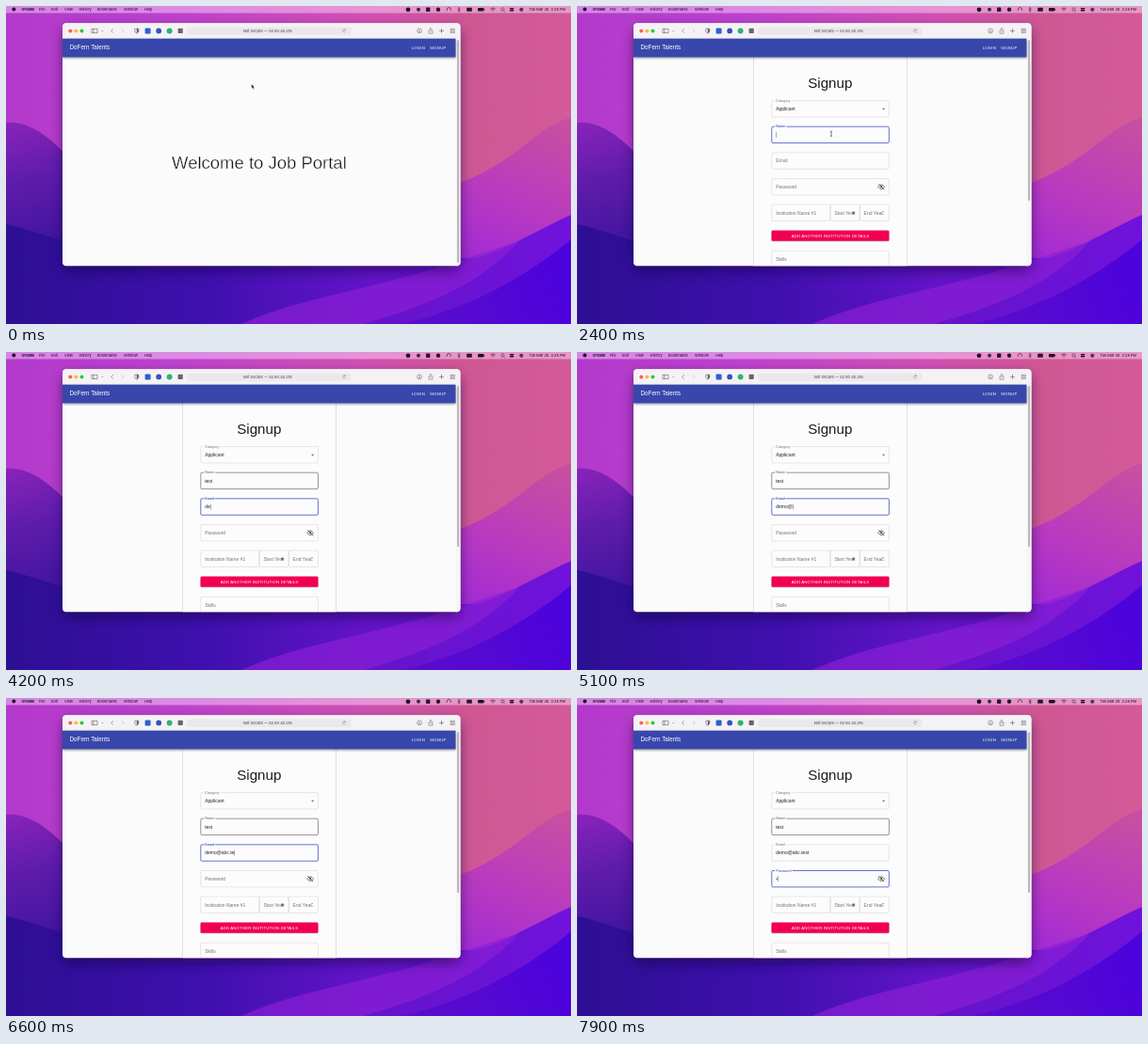
An HTML page for the animation above (8 s loop, 600x338 px).

```html
<!DOCTYPE html>
<html lang="en">
<head>
<meta charset="utf-8">
<title>Signup walkthrough</title>
<style>
  html, body { margin: 0; width: 100%; height: 100%; overflow: hidden; background: #6a1fc0; }
  svg { display: block; width: 100%; height: 100%; }
  text { font-family: "Liberation Sans", Arial, sans-serif; white-space: pre; }
  .ui { font-family: Inter, "Open Sans", sans-serif; }
</style>
</head>
<body>
<svg id="stage" viewBox="0 0 600 338">
  <defs>
    <linearGradient id="sky" x1="0" y1="0" x2="600" y2="0" gradientUnits="userSpaceOnUse">
      <stop offset="0" stop-color="#b239cb"/><stop offset=".3" stop-color="#bd42cd"/>
      <stop offset=".62" stop-color="#cf50b4"/><stop offset=".82" stop-color="#cf5794"/>
      <stop offset="1" stop-color="#d45a99"/>
    </linearGradient>
    <linearGradient id="leftHill" x1="0" y1="115" x2="40" y2="270" gradientUnits="userSpaceOnUse">
      <stop offset="0" stop-color="#8f24bd"/><stop offset=".45" stop-color="#5f1cab"/>
      <stop offset="1" stop-color="#3b139c"/>
    </linearGradient>
    <linearGradient id="rightHill" x1="570" y1="110" x2="490" y2="300" gradientUnits="userSpaceOnUse">
      <stop offset="0" stop-color="#c7519f"/><stop offset=".45" stop-color="#bb3cbd"/>
      <stop offset="1" stop-color="#9a25dc"/>
    </linearGradient>
    <linearGradient id="floor" x1="0" y1="0" x2="600" y2="0" gradientUnits="userSpaceOnUse">
      <stop offset="0" stop-color="#2c0f92"/><stop offset=".35" stop-color="#3f0fae"/>
      <stop offset=".65" stop-color="#6414ca"/><stop offset="1" stop-color="#7012dc"/>
    </linearGradient>
    <linearGradient id="corner" x1="430" y1="338" x2="600" y2="270" gradientUnits="userSpaceOnUse">
      <stop offset="0" stop-color="#5a0dcc"/><stop offset="1" stop-color="#4b02dc"/>
    </linearGradient>
    <filter id="shade" x="-20%" y="-20%" width="140%" height="150%"><feGaussianBlur stdDeviation="7"/></filter>
    <filter id="soft" x="-5%" y="-50%" width="110%" height="220%"><feGaussianBlur stdDeviation="1"/></filter>
    <clipPath id="frame"><rect x="60" y="18.3" width="422.5" height="258" rx="4"/></clipPath>
  </defs>

  <rect width="600" height="338" fill="url(#sky)"/>
  <path d="M0 124C24 122 44 138 66 160L200 338H0Z" fill="url(#leftHill)"/>
  <path d="M600 118C560 130 540 170 470 192V338H600Z" fill="url(#rightHill)"/>
  <path d="M0 232C40 240 80 262 150 268H500C530 260 570 235 600 222V338H0Z" fill="url(#floor)"/>
  <path d="M250 338C310 310 390 302 483 270L545 250C500 300 440 320 380 338Z" fill="#8a1fd6" opacity=".7"/>
  <path d="M420 338C490 322 550 290 600 248V338Z" fill="url(#corner)"/>
  <rect width="600" height="7.5" fill="#ffe2ff" opacity=".45"/>
  <g id="menu"></g>

  <rect x="61" y="25" width="421" height="256" rx="5" fill="#10002c" opacity=".55" filter="url(#shade)"/>
  <rect x="59.8" y="18.1" width="422.9" height="258.4" rx="4.2" fill="#4a3a5c" opacity=".5"/>
  <g clip-path="url(#frame)">
    <rect x="60" y="18" width="423" height="259" fill="#fcfbfc"/>
    <g id="home"></g>
    <g id="form"></g>
    <rect x="477.5" y="34" width="6" height="243" fill="#f7f6f7"/>
    <rect id="thumb" x="479" y="36" width="2.2" rx="1.1" fill="#b9b8ba"/>
    <rect x="60" y="37" width="417.5" height="18.5" fill="#000" opacity=".4" filter="url(#soft)"/>
    <rect x="60" y="34.3" width="417.5" height="20" fill="#3847ab"/>
    <rect id="hover" x="447" y="38.8" width="24" height="11.3" rx="1.3" fill="#fff" opacity=".12"/>
    <g id="header"></g>
    <rect x="60" y="18" width="423" height="16.3" fill="#f5f2f5"/>
    <path d="M60 34.3H483" stroke="#d6d2d8" stroke-width=".3"/>
    <g id="toolbar"></g>
  </g>
  <path id="arrow" d="M0 0V4.6L1.1 3.7L1.9 5.4L2.7 5L1.9 3.4H3.3Z" fill="#111" stroke="#fff" stroke-width=".35"/>
  <path id="beam" d="M-1.1-2.6Q0-2.6 0-2V2Q0 2.6-1.1 2.6M1.1-2.6Q0-2.6 0-2M0 2Q0 2.6 1.1 2.6" fill="none" stroke="#222" stroke-width=".6"/>
</svg>

<script>
const LOOP = 8000, STEP = 100, FOCUS = "#2f45b8", IDLE = "#c4c3c5", PAPER = "#fdfcfd";
const $ = id => document.getElementById(id);
const clamp = v => Math.max(0, Math.min(1, v));
const mix = (a, b, p) => a + (b - a) * p;
const ease = p => p * p * (3 - 2 * p);

function set(node, attrs) {
  for (const key in attrs) node.setAttribute(key, attrs[key]);
  return node;
}
function add(parent, tag, attrs) {
  const node = document.createElementNS("http://www.w3.org/2000/svg", tag);
  parent.appendChild(set(node, attrs));
  return node;
}
function label(parent, x, y, size, content, attrs = {}) {
  const node = add(parent, "text", { x, y, "font-size": size, fill: "#222", ...attrs });
  node.textContent = content;
  return node;
}
const line = (parent, d, attrs = {}) =>
  add(parent, "path", { d, fill: "none", stroke: "#5c595f", "stroke-width": .6, ...attrs });
const dot = (parent, cx, cy, r, fill) => add(parent, "circle", { cx, cy, r, fill });
const box = (parent, x, y, width, height, rx, fill) => add(parent, "rect", { x, y, width, height, rx, fill });
const show = (node, on) => node.setAttribute("visibility", on ? "visible" : "hidden");

function buildMenu() {
  const g = $("menu"), ui = { class: "ui", fill: "#1c1022" };
  dot(g, 8.3, 3.6, 2, "#1c1022");
  label(g, 16.5, 5, 3.9, "Orvane", { ...ui, "font-weight": 700 });
  [["File", 35], ["Edit", 48], ["View", 62], ["History", 77.5], ["Bookmarks", 97], ["Window", 125], ["Help", 147]]
    .forEach(([name, x]) => label(g, x, 5, 3.9, name, ui));
  dot(g, 427, 3.8, 2.4, "#1c1022");
  dot(g, 438, 3.8, 2, "#3c2440");
  box(g, 446, 1.6, 4.4, 4.4, .8, "#2a1630");
  dot(g, 459, 3.8, 2.2, "#2a1630");
  line(g, "M468.3 5V3.6A2 2 0 0 1 472.3 3.6V5", { stroke: "#1c1022" });
  line(g, "M479.7 2.6L482.3 5L481 6.2V1.3L482.3 2.6L479.7 5", { stroke: "#1c1022", "stroke-width": .45 });
  box(g, 489.2, 1.8, 5.6, 4, .6, "#2a1630");
  box(g, 501, 2, 6.4, 3.6, .8, "#1c1022");
  box(g, 507.7, 3, .5, 1.6, .2, "#1c1022");
  line(g, "M514.4 3Q517 .9 519.6 3M515.5 4.2Q517 3 518.5 4.2M516.6 5.4H517.4", { stroke: "#1c1022" });
  line(g, "M528.5 5L529.8 6.2M529 3.5A1.6 1.6 0 1 1 525.8 3.5A1.6 1.6 0 1 1 529 3.5", { stroke: "#1c1022", "stroke-width": .5 });
  box(g, 534.8, 2, 4.6, 1.5, .75, "#1c1022");
  box(g, 534.8, 4.1, 4.6, 1.5, .75, "#1c1022");
  dot(g, 547.3, 3.8, 2.1, "#4a3a6a");
  label(g, 594, 5, 3.9, "Tue Mar 28  3:28 PM", { ...ui, "text-anchor": "end" });
}

function buildToolbar() {
  const g = $("toolbar");
  ["#fe5f57", "#febc2e", "#28c840"].forEach((fill, i) => dot(g, 68.3 + i * 6.1, 26.4, 2, fill));
  line(g, "M91 24.3H97V28.6H91ZM93 24.3V28.6");
  line(g, "M101.4 26L102.4 27L103.4 26", { "stroke-width": .4 });
  line(g, "M113.7 24.3L111.7 26.4L113.7 28.5");
  line(g, "M123 24.3L125 26.4L123 28.5", { stroke: "#b4b0b6" });
  line(g, "M136.7 24.4L138.8 23.8L140.9 24.4V26.5Q140.6 28.4 138.8 29.2Q137 28.4 136.7 26.5Z");
  line(g, "M138.8 24V29Q140.6 28.2 140.7 26.3V24.5Z", { fill: "#5c595f", stroke: "none" });
  box(g, 147.6, 23.4, 6, 6, 1, "#2d5fd0");
  dot(g, 162.2, 26.4, 2.9, "#3352b8");
  dot(g, 173.6, 26.4, 3, "#2fb36c");
  box(g, 182.6, 23.7, 5.2, 5.4, .8, "#68656a");
  box(g, 192.5, 22.4, 174, 8.3, 1.7, "#ebe8ec");
  label(g, 277.8, 28, 4, "Not Secure — 52.90.40.216", { class: "ui", fill: "#3d3a40", "text-anchor": "middle" });
  line(g, "M360.3 25.4A1.5 1.5 0 1 0 360.5 27M360.5 24.4V25.6H359.3", { "stroke-width": .4 });
  line(g, "M441.6 26.4A2.5 2.5 0 1 1 436.6 26.4A2.5 2.5 0 1 1 441.6 26.4M439.1 24.8V27.8M438 26.8L439.1 27.9L440.2 26.8", { "stroke-width": .5 });
  line(g, "M450 25.6H449V29.2H453V25.6H452M451 27.5V23.3M449.9 24.4L451 23.3L452.1 24.4", { "stroke-width": .5 });
  line(g, "M462.5 24V28.8M460.1 26.4H464.9");
  line(g, "M472 24.2H473.7V25.9H472ZM474.7 24.2H476.4V25.9H474.7ZM472 26.9H473.7V28.6H472ZM474.7 26.9H476.4V28.6H474.7Z", { "stroke-width": .45 });
}

function buildHeader() {
  const g = $("header"), caps = { fill: "#fff", "letter-spacing": .12 };
  label(g, 67.5, 46.4, 6.3, "DoFern Talents", { fill: "#fff" });
  label(g, 430.8, 46, 4.375, "LOGIN", caps);
  label(g, 450, 46, 4.375, "SIGNUP", caps);
}

// Outlined input whose label shrinks into the top border.
function makeField(title, x, y, width, floated) {
  const g = add($("form"), "g", {});
  const outline = add(g, "rect", { x, y, width, height: 17.4, rx: 1.25, fill: "none", stroke: IDLE, "stroke-width": .4 });
  const notch = box(g, x + 3.2, y - .6, 0, 1.3, 0, PAPER);
  const caption = label(g, x + 4.4, 0, 5, title);
  const value = label(g, x + 4.4, y + 10.6, 5, "");
  const caret = box(g, 0, y + 5.7, .35, 6, 0, "#111");
  const api = {
    value,
    update(float, focused, hovered, content) {
      set(outline, { stroke: focused ? FOCUS : hovered ? "#2a2a2c" : IDLE, "stroke-width": focused ? .75 : hovered ? .5 : .4 });
      set(caption, { y: mix(y + 10.6, y + 1.2, float), "font-size": mix(5, 3.75, float), fill: focused ? FOCUS : "#747277" });
      notch.setAttribute("width", float > 0 ? (caption.getComputedTextLength() + 2.4) * float : 0);
      value.textContent = content;
      caret.setAttribute("x", x + 4.6 + value.getComputedTextLength());
      show(caret, focused);
    }
  };
  api.update(floated ? 1 : 0, false, false, floated || "");
  return api;
}

function buildForm() {
  const g = $("form");
  box(g, 187.5, 50, 163, 230, 0, PAPER);
  line(g, "M187.5 50V280M350.5 50V280", { stroke: "#d5d3d6", "stroke-width": .7 });
  label(g, 268.8, 87.4, 15.1, "Signup", { "text-anchor": "middle", fill: "#1b1b1c" });
  makeField("Category", 206.8, 100.6, 124.6, "Applicant");
  add(g, "path", { d: "M324 108.7H327.2L325.6 110.4Z", fill: "#666" });
  const fields = ["Name", "Email", "Password"].map((title, i) => makeField(title, 206.8, 128.2 + i * 27.65, 124.6));
  makeField("Institution Name #1", 206.8, 211, 62.2);
  makeField("Start Year", 269, 211, 31.2);
  makeField("End Year", 300.2, 211, 31.2);
  dot(g, 293.6, 219.8, 1.6, "#77757a");
  line(g, "M324 219L325 218L326 219M324 220.7L325 221.7L326 220.7", { "stroke-width": .5 });
  line(g, "M319.8 192.2Q323.2 187.5 326.6 192.2Q323.2 196.9 319.8 192.2ZM320.3 189L326.2 195.3", { stroke: "#444", "stroke-width": .75 });
  dot(g, 323.2, 192.2, 1.1, "#444");
  box(g, 206.5, 239.6, 125, 11, 1.25, "#000").setAttribute("opacity", .18);
  box(g, 206.5, 238.6, 125, 11.2, 1.25, "#f10050");
  label(g, 269, 245.8, 4.375, "ADD ANOTHER INSTITUTION DETAILS", { fill: "#fff", "text-anchor": "middle", "letter-spacing": .11 });
  makeField("Skills", 206.8, 260.2, 124.6);
  return fields;
}

buildMenu();
buildToolbar();
buildHeader();
label($("home"), 176, 173, 18.5, "Welcome to Job Portal", { fill: "#111", stroke: "#fcfbfc", "stroke-width": .42 });
const [nameField, emailField, passwordField] = buildForm();

// time, x, y
const route = [[0, 260.8, 83], [150, 262, 82], [700, 457, 44], [1100, 457, 44], [1400, 366.2, 74.3], [1900, 270, 135.8]];
function pointer(t) {
  const i = route.findIndex(stop => stop[0] > t);
  if (i < 0) return route[route.length - 1].slice(1);
  const [t0, x0, y0] = route[i - 1], [t1, x1, y1] = route[i];
  const p = ease((t - t0) / (t1 - t0));
  return [mix(x0, x1, p), mix(y0, y1, p)];
}

const typed = (content, keys, t) => content.slice(0, keys.filter(key => key <= t).length);
const nameKeys = [2700, 2800, 3000, 3100];
const emailKeys = [4100, 4200, 4400, 4500, 5000, 5600, 5700, 5900, 6000, 6300, 6500, 6700, 6800];
const passwordKeys = [7800];

function draw(t) {
  const signup = t >= 1000;
  show($("home"), !signup);
  $("form").style.display = signup ? "" : "none";
  $("thumb").setAttribute("height", signup ? 171 : 237);
  show($("hover"), t >= 600 && t < 1700);

  const [x, y] = pointer(t), typing = t >= 2700, overText = t >= 1800;
  set($("arrow"), { transform: `translate(${x} ${y})` });
  set($("beam"), { transform: `translate(${x} ${y})` });
  show($("arrow"), !overText);
  show($("beam"), overText && !typing);

  if (!signup) return;
  const float = start => ease(clamp((t - start) / 200));
  nameField.update(float(2000), t >= 2000 && t < 3700, t >= 1900, typed("test", nameKeys, t));
  emailField.update(float(3700), t >= 3700 && t < 7200, false, typed("demo@abc.test", emailKeys, t));
  passwordField.update(float(7200), t >= 7200, false, typed("•", passwordKeys, t));
}

const began = performance.now();
function tick() {
  const elapsed = (performance.now() - began) % LOOP;
  draw(Math.floor(elapsed / STEP) * STEP);
  requestAnimationFrame(tick);
}
tick();
</script>
</body>
</html>
```
